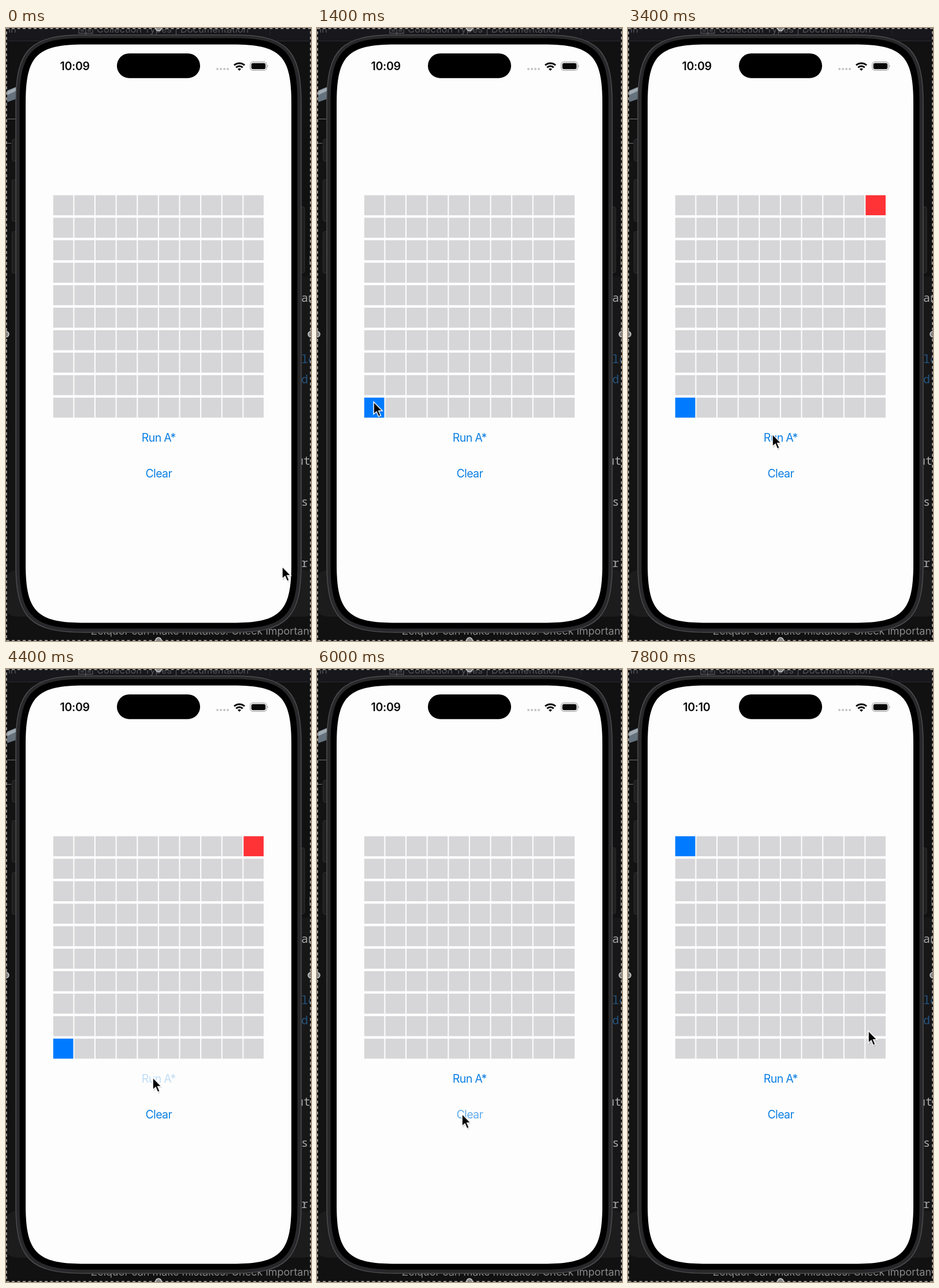
An HTML page for the animation above (8 s loop, 528 by 1061 pixels).

```html
<!DOCTYPE html>
<html lang="en">
<head>
<meta charset="utf-8">
<title>A* grid</title>
<style>
html, body { margin: 0; width: 100%; height: 100%; overflow: hidden; background: #101010; }
svg { display: block; width: 528px; height: 1061px; font-family: Inter, Roboto, sans-serif; }
.code { font: 20px "Noto Sans Mono", monospace; fill: #a9a9ab; }
.code .key { fill: #245480; }
.clock { font-size: 19.6px; font-weight: 600; letter-spacing: -.35px; text-anchor: middle; fill: #090909; }
.button { font-size: 19.5px; letter-spacing: -.65px; text-anchor: middle; fill: #0b7fe2; }

.anim, .start, .goal, .path, .next { animation: 8s step-end infinite; }
.start { fill: #007bff; animation-name: start; }
.goal { fill: #ff3236; animation-name: goal; }
.path { fill: #2ebd50; animation-name: path; }
.next { fill: #007bff; animation-name: next; }
.run { animation-name: run; }
.clear { animation-name: clear; }
.before { animation-name: before; }
.after { animation-name: after; }
.cursor { animation-name: cursor; }

@keyframes start { 0%, 75% { opacity: 0 } 15% { opacity: 1 } }
@keyframes goal { 0%, 75% { opacity: 0 } 32.5% { opacity: 1 } }
@keyframes path { 0%, 75% { opacity: 0 } 57.5% { opacity: 1 } }
@keyframes next { 0% { opacity: 0 } 90%, 100% { opacity: 1 } }
@keyframes run { 0%, 60% { opacity: 1 } 52.5% { opacity: .2 } 55% { opacity: .25 } 57.5% { opacity: .75 } }
@keyframes clear { 0%, 77.5% { opacity: 1 } 72.5% { opacity: .2 } 75% { opacity: .65 } }
@keyframes before { 0% { opacity: 1 } 85%, 100% { opacity: 0 } }
@keyframes after { 0% { opacity: 0 } 85%, 100% { opacity: 1 } }
@keyframes cursor {
  0% { transform: translate(478px, 932px) }
  5% { transform: translate(468px, 922px) }
  7.5% { transform: translate(388px, 852px) }
  10% { transform: translate(222px, 732px) }
  12.5% { transform: translate(112px, 660px) }
  15%, 20% { transform: translate(98px, 647px) }
  22.5% { transform: translate(140px, 600px) }
  25% { transform: translate(270px, 455px) }
  27.5% { transform: translate(392px, 330px) }
  30%, 35% { transform: translate(428px, 301px) }
  37.5% { transform: translate(395px, 380px) }
  40% { transform: translate(290px, 615px) }
  42.5% { transform: translate(250px, 703px) }
  47.5% { transform: translate(252px, 705px) }
  50%, 57.5% { transform: translate(254px, 707px) }
  60% { transform: translate(252px, 722px) }
  62.5% { transform: translate(247px, 756px) }
  65% { transform: translate(245px, 768px) }
  70%, 77.5% { transform: translate(251px, 770px) }
  80% { transform: translate(228px, 700px) }
  82.5% { transform: translate(160px, 480px) }
  85% { transform: translate(108px, 330px) }
  87.5%, 90% { transform: translate(98px, 303px) }
  92.5% { transform: translate(160px, 362px) }
  95% { transform: translate(320px, 530px) }
  97.5%, 100% { transform: translate(416px, 626px) }
}
</style>
</head>
<body>
<svg viewBox="0 0 528 1061">
  <!-- desktop behind the phone -->
  <rect width="528" height="1061" fill="#111112"/>
  <rect width="528" height="22" fill="#17171c"/>
  <path d="M0 22.5H528M457 0V12" stroke="#29292d"/>
  <g fill="#555559" font-size="16.5">
    <text x="4" y="8">in</text>
    <text x="157" y="8">Collection Types | Documentation</text>
  </g>
  <path d="M126 0V9H137L138 11L139 9H150V0M138 0V9M129 2H135M129 5H135M141 2H147M141 5H147" fill="none" stroke="#555559" stroke-width="1.3"/>
  <path d="M0 109L17 102V123L0 129Z" fill="#65727d"/>
  <path d="M0 110L17 103V109L0 117Z" fill="#a0aab2"/>
  <path d="M0 157.500H16M1.500 148V166M0 199.500H9M1.500 190V207" stroke="#747474" fill="none"/>
  <rect y="231" width="17" height="709" fill="#131313"/>
  <g fill="#1e1e1f" stroke="#303032">
    <rect x="10.500" y="192.500" width="20" height="38" rx="3"/>
    <rect x="10.500" y="262.500" width="20" height="72" rx="3"/>
    <rect x="10.500" y="352.500" width="20" height="72" rx="3"/>
    <rect x="500" y="309.500" width="17" height="114" rx="3"/>
  </g>
  <rect x="-8" y="938" width="552" height="81" rx="28" fill="#1c1c1d"/>
  <rect x="511" y="430" width="17" height="508" fill="#171718"/>
  <g class="code">
    <text x="524" y="405">p</text>
    <text x="511" y="474">an</text>
    <text class="key" x="511" y="580">le</text>
    <text class="key" x="511" y="615">d</text>
    <text x="503" y="756">ut</text>
    <text x="511" y="827">s</text>
    <text x="511" y="933">r</text>
  </g>
  <text x="531" y="1050" font-size="18" text-anchor="end" fill="#89898b">Zelquor can make mistakes. Check important</text>

  <!-- phone -->
  <g id="phone"></g>
  <rect x="192" y="44" width="144" height="42.700" rx="21.300" fill="#000"/>
  <text class="clock anim before" x="119.200" y="73">10:09</text>
  <text class="clock anim after" x="118.800" y="73">10:10</text>
  <g fill="#c5c5c7">
    <circle cx="366" cy="71" r="2"/><circle cx="372" cy="71" r="2"/>
    <circle cx="378" cy="71" r="2"/><circle cx="384" cy="71" r="2"/>
  </g>
  <g fill="none" stroke="#080808" stroke-width="3">
    <path d="M395 64.500A13 13 0 0 1 413 64.500M398.300 68.300A8.300 8.300 0 0 1 409.700 68.300"/>
    <path d="M401 71Q404 68.400 407 71L404 74Z" fill="#080808" stroke="none"/>
  </g>
  <rect x="422.700" y="58.700" width="28.600" height="14.600" rx="4.800" fill="none" stroke="#a5a5a7" stroke-width="1.2"/>
  <rect x="424.700" y="60.700" width="24.600" height="10.600" rx="3" fill="#080808"/>
  <path d="M452.500 63.500Q455 66 452.500 68.500Z" fill="#a5a5a7"/>

  <g id="grid" fill="#d6d6d8"></g>
  <text class="button anim run" x="264.300" y="716">Run A*</text>
  <text class="button anim clear" x="264.300" y="778">Clear</text>

  <!-- recording selection -->
  <rect x=".5" y=".5" width="527" height="1060" fill="none" stroke="#111" stroke-width="3"/>
  <rect x=".5" y=".5" width="527" height="1060" fill="none" stroke="#a2a2a2" stroke-width="2.5" stroke-dasharray="5 4.500"/>
  <g fill="#858585" stroke="#d0d0d0" stroke-width="1.5">
    <circle cx="264" cy="0" r="5"/><circle cx="264" cy="1060" r="5"/>
    <circle cx="0" cy="530" r="5"/><circle cx="528" cy="530" r="5"/>
  </g>

  <g class="anim cursor">
    <g transform="scale(1.08)">
      <path d="M1 3V22L5.500 18L8.700 25.500L12 24L8.800 16.500H14.500Z" fill="#000" opacity=".18"/>
      <path d="M0 0V19.800L4.600 15.700L7.800 23.500L11.300 22L8 14.400H14Z" fill="#000" stroke="#fff" stroke-width="1.4"/>
    </g>
  </g>
</svg>
<script>
const phone = document.getElementById('phone');
const grid = document.getElementById('grid');

function add(parent, tag, attrs) {
  const node = document.createElementNS('http://www.w3.org/2000/svg', tag);
  for (const key in attrs) node.setAttribute(key, attrs[key]);
  parent.append(node);
}

// Rounded box with continuous corners: reach is the corner length, pull its tightness
function shell(x, y, w, h, reach, pull, style) {
  const r = x + w, b = y + h;
  add(phone, 'path', {
    d: `M${x} ${y + reach}C${x} ${y + pull} ${x + pull} ${y} ${x + reach} ${y}` +
       `H${r - reach}C${r - pull} ${y} ${r} ${y + pull} ${r} ${y + reach}` +
       `V${b - reach}C${r} ${b - pull} ${r - pull} ${b} ${r - reach} ${b}` +
       `H${x + reach}C${x + pull} ${b} ${x} ${b - pull} ${x} ${b - reach}Z`,
    ...style
  });
}

function cell(col, row, name = '') {
  add(grid, 'rect', {
    x: 81.8 + 36.62 * col, y: 289.5 + 38.92 * row,
    width: 34.6, height: 34.6, class: name
  });
}

shell(17, 12, 494, 1034, 118, 25, { fill: '#28282a', stroke: '#4c4c4e', 'stroke-width': 1.5 });
shell(23.5, 17.5, 481, 1022, 110, 23, { fill: '#000' });
shell(34, 28.5, 460, 1001, 102, 19, { fill: '#fdfdfd' });

for (let row = 0; row < 10; row++)
  for (let col = 0; col < 10; col++) cell(col, row);

for (let i = 1; i < 9; i++) cell(i, 9 - i, 'path');
cell(0, 9, 'start');
cell(9, 0, 'goal');
cell(0, 0, 'next');
</script>
</body>
</html>
```
